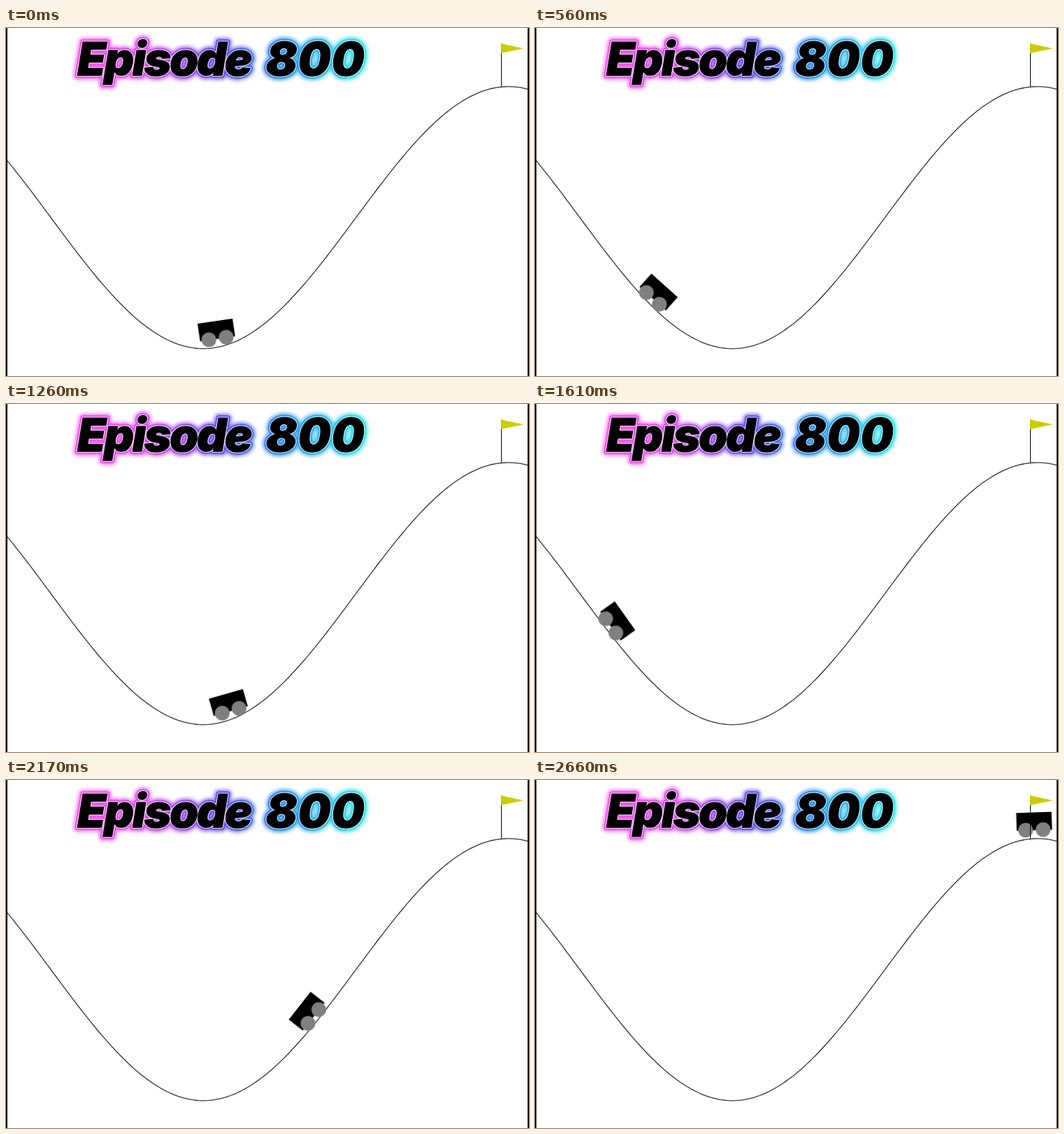
Animation, 748 px wide and 498 px high, one loop 2730 ms. Source, as an HTML page:

```html
<!DOCTYPE html>
<html lang="en">
<head>
<meta charset="utf-8">
<title>Mountain car</title>
<style>
  html, body { margin: 0; width: 100%; height: 100%; overflow: hidden; background: #fff; }
  svg { display: block; }
  .title { font: italic 900 66px Inter, sans-serif; text-anchor: middle; stroke-linejoin: round; }
  .word { letter-spacing: -2.5px; }
  .digits { letter-spacing: 1px; }
</style>
</head>
<body>
<svg width="748" height="498" viewBox="0 0 748 498">
  <defs>
    <linearGradient id="neon" gradientUnits="userSpaceOnUse" x1="98" y1="0" x2="516" y2="0">
      <stop offset="0" stop-color="#ff3ee8"/>
      <stop offset=".25" stop-color="#d640f0"/>
      <stop offset=".5" stop-color="#5a3cf0"/>
      <stop offset=".7" stop-color="#1684f0"/>
      <stop offset="1" stop-color="#14e6ea"/>
    </linearGradient>
    <filter id="blur" filterUnits="userSpaceOnUse" x="70" y="0" width="480" height="110">
      <feGaussianBlur stdDeviation="2.4"/>
    </filter>
    <g id="label">
      <text class="word" x="226" y="67.5">Episode</text>
      <text class="digits" x="442.5" y="67.5">800</text>
    </g>
  </defs>

  <g class="title">
    <use href="#label" fill="none" stroke="url(#neon)" stroke-width="12" opacity=".7" filter="url(#blur)"/>
    <use href="#label" fill="none" stroke="url(#neon)" stroke-width="7"/>
    <use href="#label" fill="none" stroke="#fff" stroke-opacity=".65" stroke-width="4"/>
    <use href="#label" fill="#000" stroke="#000" stroke-width="1"/>
  </g>

  <path id="track" fill="none" stroke="#333" stroke-width="1.3"/>

  <g id="car">
    <rect x="-25.3" y="-25" width="50.6" height="25.5"/>
    <circle cx="-12.5" r="10.6" fill="#808080"/>
    <circle cx="12.5" r="10.6" fill="#808080"/>
  </g>

  <path d="M708.5 22V85" stroke="#000"/>
  <path d="M708 22.3V36L740.5 29.2Z" fill="#cccc00"/>
  <path d="M0 0H2V498H0ZM746 0H748V498H746Z"/>
</svg>
<script>
  const STEP = 70;
  const COUNT = 39;
  const SCALE = 1250 / 3;
  const CLEARANCE = 12.5;

  // Key points of the swing: [step, position, velocity per step]
  const keys = [
    [0, -.475, 0],
    [5, -.687, -.062],
    [7.4, -.803, 0],
    [12, -.510, .104],
    [15.35, -.298, 0],
    [18, -.430, -.095],
    [23, -.941, -.05],
    [24.3, -.965, 0],
    [31, -.146, .156],
    [38, .513, .07]
  ];

  const toX = p => 0.5 + SCALE * (p + 1.2);
  const toY = p => 500.5 - SCALE * (0.55 + 0.45 * Math.sin(3 * p));

  // Cubic Hermite curve through the key points
  function positionAt(step) {
    const i = Math.max(1, keys.findIndex(key => key[0] >= step));
    const [s0, p0, v0] = keys[i - 1];
    const [s1, p1, v1] = keys[i];
    const h = s1 - s0;
    const u = (step - s0) / h;
    const w = 1 - u;
    return p0 + (p1 - p0) * u * u * (3 - 2 * u) + h * u * w * (v0 * w - v1 * u);
  }

  function pose(step) {
    const p = positionAt(step);
    return `translate(${toX(p)}px, ${toY(p) - CLEARANCE}px) rotate(${-Math.cos(3 * p)}rad)`;
  }

  const points = [];
  for (let p = -1.2; p < 0.61; p += 0.01) {
    points.push(`${toX(p).toFixed(2)} ${toY(p).toFixed(2)}`);
  }
  document.getElementById('track').setAttribute('d', 'M' + points.join('L'));

  const frames = [];
  for (let i = 0; i <= COUNT; i++) {
    frames.push({
      transform: pose(Math.min(i, COUNT - 1)),
      offset: i / COUNT,
      easing: 'steps(1, end)'
    });
  }
  document.getElementById('car').animate(frames, {
    duration: STEP * COUNT, iterations: Infinity
  });
</script>
</body>
</html>
```
